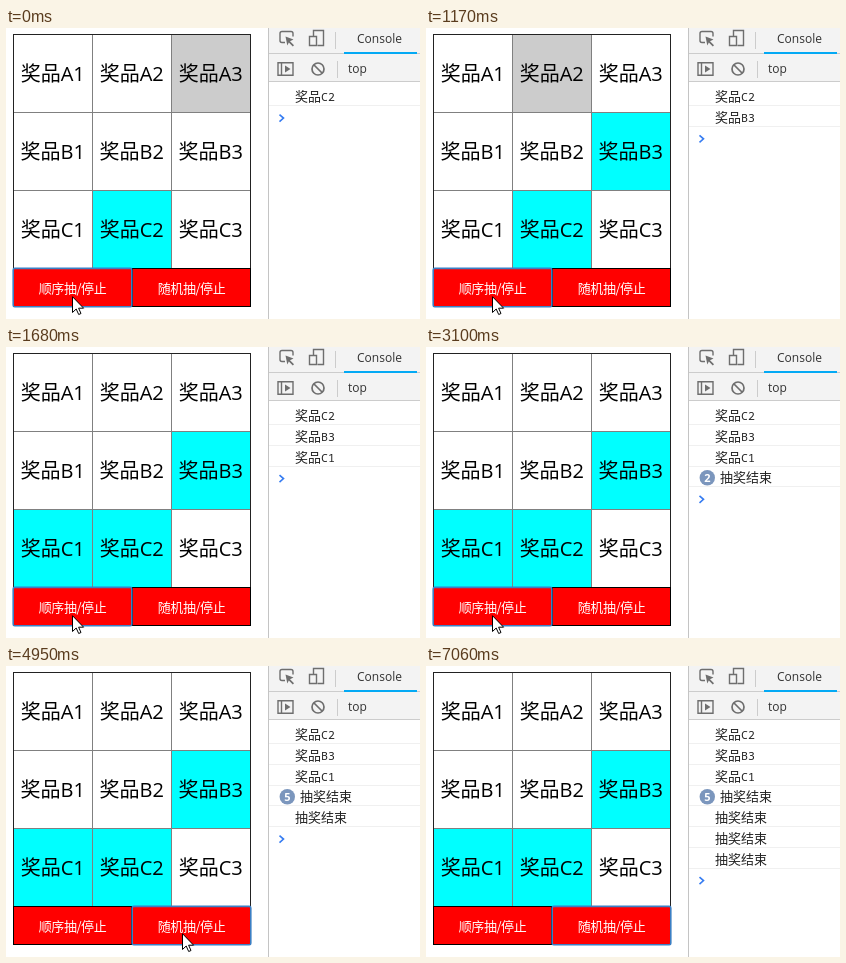
An HTML page that plays this animation: 414 by 291 pixels, repeating every 7490 ms.

```html
<!DOCTYPE html>
<html lang="zh-CN">
<head>
<meta charset="utf-8">
<style>
  html, body { margin: 0; width: 100%; height: 100%; overflow: hidden; background: #fff; }
  svg { display: block; }
  rect { shape-rendering: crispEdges; }
  .ring { shape-rendering: auto; fill: none; stroke: #3b7fc4; stroke-width: 1.6; }
  .prize { font: 20px "Open Sans", "Noto Sans CJK SC", sans-serif; text-anchor: middle; }
  .button { font: 13px "Noto Sans CJK SC", sans-serif; letter-spacing: -.45px; text-anchor: middle; fill: #fff; }
  .log { font: 13px "Noto Sans CJK SC", sans-serif; fill: #222; }
  .code { font: 11.5px "Noto Sans Mono", monospace; }
  .badge { font: bold 11px "Open Sans", sans-serif; text-anchor: middle; fill: #fff; }
  .ui { font: 12px "Open Sans", sans-serif; fill: #333; }
  .icon { fill: none; stroke: #6e6e6e; stroke-width: 1.4; }
</style>
</head>
<body>
<svg id="stage" width="414" height="291" viewBox="0 0 414 291"></svg>
<script>
const LOOP = 7490;
const END = '抽奖结束';
const PITCH = 20.75;

const start = {
  active: 'A3', won: ['C2'], ends: 0, badge: 1,
  focus: 0, cursor: [66, 268]
};

// Each entry changes part of the state at the given time (ms).
const events = [
  [150, { active: 'B1' }],
  [280, { active: 'B2' }],
  [400, { active: '', won: ['C2', 'B3'] }],
  [1170, { active: 'A2' }],
  [1290, { active: 'A3' }],
  [1410, { active: 'B1' }],
  [1560, { active: 'B2' }],
  [1680, { active: '', won: ['C2', 'B3', 'C1'] }],
  [2520, { ends: 1 }],
  [3100, { badge: 2 }],
  [3540, { badge: 3 }],
  [3840, { badge: 4 }],
  [4120, { badge: 5 }],
  [4250, { cursor: [123, 271] }],
  [4400, { cursor: [156, 267] }],
  [4550, { cursor: [176, 267] }],
  [4830, { focus: 1 }],
  [4950, { ends: 2 }],
  [5890, { cursor: [135, 267] }],
  [6010, { cursor: [109, 267] }],
  [6150, { focus: 0 }],
  [6270, { ends: 3 }],
  [6390, { cursor: [146, 267] }],
  [6540, { cursor: [175, 271] }],
  [6660, { focus: 1, ends: 4 }],
  [6910, { cursor: [253, 284] }],
  [7060, { cursor: null }]
];

const rect = (x, y, w, h, fill) =>
  `<rect x="${x}" y="${y}" width="${w}" height="${h}" fill="${fill}"/>`;
const text = (x, y, cls, content) => `<text x="${x}" y="${y}" class="${cls}">${content}</text>`;

function grid({ active, won }) {
  let out = rect(7, 6, 238, 235, '#222') + rect(8, 7, 236, 233, '#808080');
  [...'ABC'].forEach((letter, row) => {
    for (let col = 0; col < 3; col++) {
      const id = letter + (col + 1), x = 8 + 79 * col, y = 7 + 78 * row;
      const fill = won.includes(id) ? '#0ff' : id === active ? '#ccc' : '#fff';
      out += rect(x, y, 78, 77, fill) + text(x + 38.7, y + 46, 'prize', '奖品' + id);
    }
  });
  return out;
}

function buttons({ focus }) {
  const draw = (label, i) => {
    const x = 7 + 119 * i;
    return rect(x, 240, 119, 39, '#000') + rect(x + 1, 241, 117, 37, '#f00') +
      text(x + 59.5, 265, 'button', label);
  };
  return ['顺序抽/停止', '随机抽/停止'].map(draw).join('') +
    `<rect class="ring" x="${7.2 + 119 * focus}" y="240.4" width="118.6" height="38.3" rx="1.5"/>`;
}

const toolbar =
  rect(262, 0, 1, 291, '#c4c4c4') + rect(263, 0, 151, 54, '#f3f3f3') +
  rect(263, 25, 151, 1, '#ccc') + rect(263, 53, 151, 1, '#ccc') +
  rect(338, 24, 73, 2, '#03a9f4') + rect(329, 4, 1, 17, '#ccc') + rect(331, 33, 1, 17, '#ccc') +
  `<g class="icon">
    <path d="M279 14.5h-3q-2 0-2-2v-7q0-2 2-2h9q2 0 2 2v3"/>
    <path d="M279.5 8.5l8 3-3.5 1.8 4 4-1.2 1.2-4-4-1.5 3z" fill="#6e6e6e" stroke="none"/>
    <path d="M307.5 8v-5.5h10v15h-6M303.5 8.500h7v9h-7z"/>
    <path d="M272 34.700h15v12.500h-15zM275.500 35v12"/>
    <path d="M279 37.500l5.500 3.500-5.500 3.500z" fill="#6e6e6e" stroke="none"/>
    <circle cx="312" cy="41" r="6" stroke-width="1.7"/><path d="M308 37l8 8" stroke-width="1.7"/>
  </g>` +
  text(351, 15, 'ui', 'Console') + text(342, 45, 'ui', 'top');

function consoleLog({ won, ends, badge }) {
  const lines = won.map(id => `奖品<tspan class="code">${id}</tspan>`).concat(Array(ends).fill(END));
  let out = '';
  lines.forEach((line, i) => {
    const y = 68.5 + PITCH * i;
    const counted = i === won.length && badge > 1;
    if (counted) {
      out += `<circle cx="281.3" cy="${y}" r="7.7" fill="#7b96bd"/>` +
        text(281.3, y + 4, 'badge', badge);
    }
    out += text(counted ? 294 : 289, y + 4.6, 'log', line) +
      rect(263, Math.round(y + 8.7), 151, 1, '#f0f0f0');
  });
  const y = 69.3 + PITCH * lines.length;
  return out + `<path d="M273.500 ${y - 3.5}l4 3.500-4 3.500" fill="none" stroke="#367cf1" stroke-width="1.6"/>`;
}

const pointer = ({ cursor }) => cursor
  ? `<path transform="translate(${cursor})" d="M.5.7v15.800l3.700-3.500 2.500 5.500 2.300-1-2.400-5.300h5z"
      fill="#fff" stroke="#000" stroke-linejoin="round"/>`
  : '';

const stage = document.getElementById('stage');
let shown = -1;

function frame() {
  const time = performance.now() % LOOP;
  const past = events.filter(([at]) => at <= time);
  if (past.length !== shown) {
    shown = past.length;
    const state = Object.assign({}, start, ...past.map(([, change]) => change));
    stage.innerHTML = grid(state) + buttons(state) + toolbar + consoleLog(state) + pointer(state);
  }
  requestAnimationFrame(frame);
}
frame();
</script>
</body>
</html>
```
